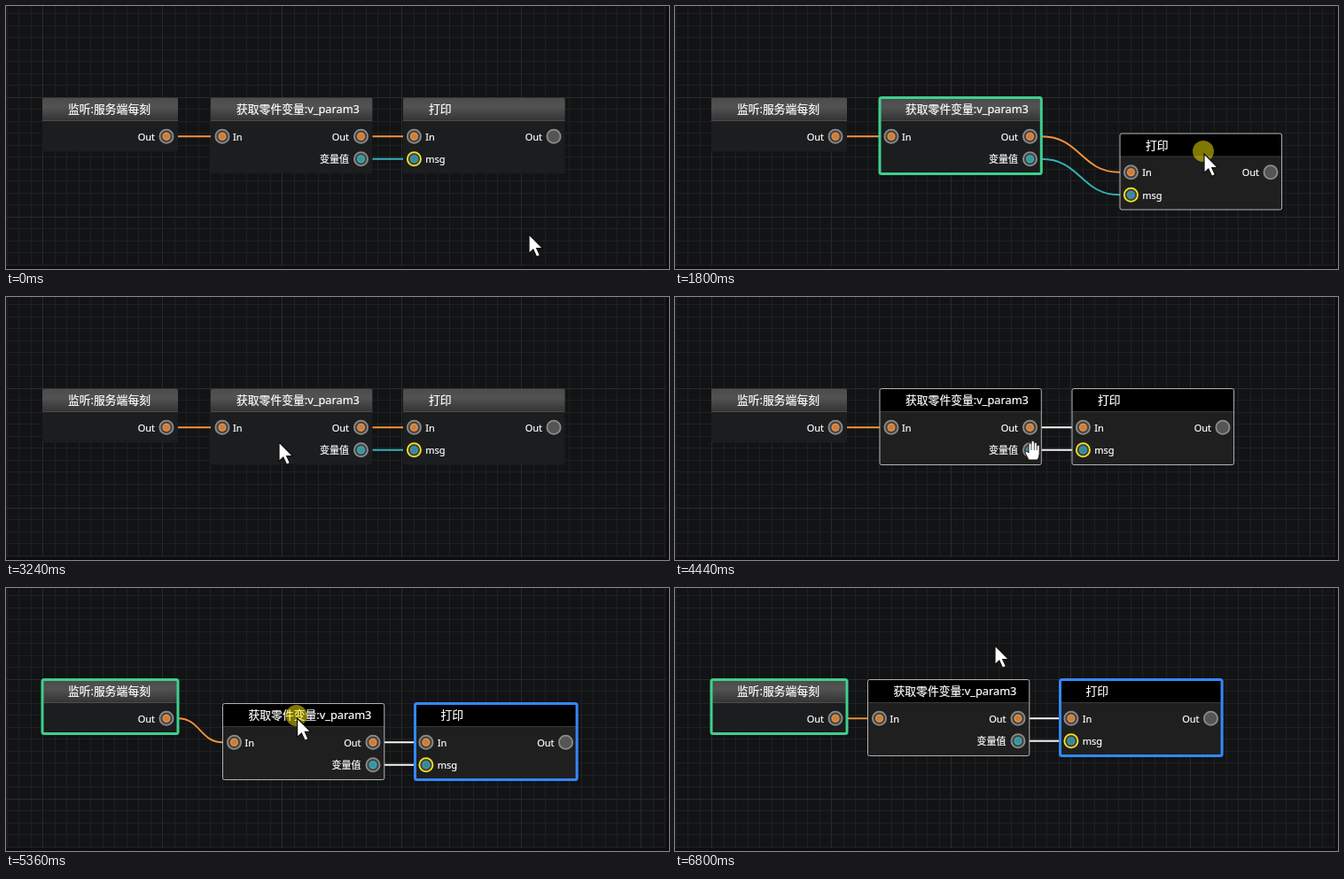
These frames come from a looping animation (748 by 297 pixels, 7.16 s). An HTML page:

```html
<!DOCTYPE html>
<html lang="zh">
<head>
<meta charset="utf-8">
<title>Node graph</title>
<style>
html, body { margin: 0; width: 100%; height: 100%; overflow: hidden; background: #121314; }
svg { display: block; }
text { font-family: "Noto Sans", "Noto Sans CJK SC", "Noto Sans CJK", sans-serif; font-size: 11px; fill: #fff; stroke: #fff; stroke-width: .2px; }
.title { font-size: 12.8px; }
</style>
</head>
<body>
<svg width="748" height="297" viewBox="0 0 748 297">
  <defs>
    <linearGradient id="head" x1="0" y1="0" x2="0" y2="1">
      <stop offset="0" stop-color="#4c4c4c"/>
      <stop offset=".4" stop-color="#525252"/>
      <stop offset="1" stop-color="#343434"/>
    </linearGradient>
  </defs>
  <g id="grid"></g>
  <path d="M745 0h3v297H0v-3h745z" fill="#0d0d0f"/>
  <g id="scene"></g>
</svg>
<script>
const LOOP = 7160, RATE = 15 / 1000, STEP = 13.5, LAG = 15, TOP = 103.5;
const ORANGE = '#f3933f', TEAL = '#36b0bb', GREEN = '#3ecf8e', BLUE = '#3388ff', WHITE = '#f4f4f4';
const scene = document.getElementById('scene');

// Pointer strokes: each runs smoothly from where the last one ended through evenly timed points
const strokes = [];
let tip = [590, 257];
function stroke(start, end, ...points) {
  const s = { start, end, points: [tip, ...points] };
  strokes.push(s);
  tip = points[points.length - 1];
  return s;
}

stroke(340, 600, [536, 126]);
const dragC = stroke(600, 2400, [590, 175], [630, 150], [550, 13], [325, 110], [500, 235],
  [597, 166], [606, 135], [565, 108], [536, 129]);
stroke(2680, 2960, [466, 249]);
const leave = stroke(3080, 3440, [308, 163], [190, 95], [128, 60]);
stroke(3600, 3740, [285, 60]);
const marquee = stroke(3740, 4180, [505, 256]);
stroke(4290, 4510, [404, 173], [319, 119]);
const dragB = stroke(4510, 6420, [400, 38], [440, 92], [330, 145], [278, 200], [300, 158], [345, 148], [310, 120]);
stroke(6640, 6800, [361, 64]);

const click = { start: leave.start, end: leave.start + 100 };
const presses = [dragC, click, marquee, dragB];
const during = (t, s) => t >= s.start && t < s.end;
const clamp = (v, lo, hi) => Math.max(lo, Math.min(hi, v));

function spline(a, b, c, d, u) {
  return b + u / 2 * (c - a + u * (2 * a - 5 * b + 4 * c - d + u * (3 * (b - c) + d - a)));
}

function pointer(t) {
  const s = strokes.filter(s => t >= s.start).pop() || strokes[0];
  const p = s.points, n = p.length - 1;
  const f = clamp((t - s.start) / (s.end - s.start), 0, 1) * n;
  const i = Math.min(n - 1, Math.floor(f));
  const at = k => p[clamp(k, 0, n)];
  return [0, 1].map(k => spline(at(i - 1)[k], at(i)[k], at(i + 1)[k], at(i + 2)[k], f - i));
}

// Grid-snapped offset of a dragged node, trailing the pointer slightly
function offset(t, s) {
  const now = pointer(clamp(t - LAG, s.start, s.end));
  return now.map((v, k) => Math.round((v - s.points[0][k]) / STEP) * STEP);
}

const label = (x, y, s, anchor = 'start') =>
  `<text x="${x}" y="${y}" text-anchor="${anchor}">${s}</text>`;

function port(x, y, color, ring = '#8c8c8c') {
  const core = color ? `<circle cx="${x}" cy="${y}" r="3.9" fill="${color}" fill-opacity=".75" stroke="${color}" stroke-width="1.2"/>` : '';
  return `<circle cx="${x}" cy="${y}" r="7.6" fill="${color ? '#454545' : '#555'}" stroke="${ring}" stroke-width="1.8"/>` + core;
}

function node({ x, y, w, h, title, selected, glow, ports }) {
  const border = glow ? `stroke="${glow}" stroke-width="3"` : selected ? 'stroke="#b4b4b4"' : '';
  return `<g transform="translate(${x} ${y})">` +
    `<rect width="${w}" height="${h}" rx="2" fill="${selected ? '#1f1f1f' : '#1b1d1e'}"/>` +
    `<path d="M0 26V2q0-2 2-2h${w - 4}q2 0 2 2v24z" fill="${selected ? '#000' : 'url(#head)'}"/>` +
    `<path d="M0 26h${w}" stroke="${selected ? '#3a3a3a' : '#4a4d4e'}"/>` +
    `<text class="title" x="29" y="17.7">${title}</text>${ports}` +
    `<rect width="${w}" height="${h}" rx="2" fill="none" ${border}/></g>`;
}

function wire(from, to, dy, color) {
  const x = from.x + from.w, y = from.y + dy, u = to.x, v = to.y + dy;
  const c = u < x ? Math.max(40, (x - u) / 2) : (u - x) / 2;
  return `<path d="M${x} ${y}C${x + c} ${y} ${u - c} ${v} ${u} ${v}" fill="none" stroke="${color}" stroke-width="1.9"/>`;
}

const arrow = (x, y) =>
  `<path transform="translate(${x} ${y + 1})" d="M0 0V21.5L4.8 17L8.6 25.3L12.4 23.6L8.7 15.5H15.4Z" fill="#fff" stroke="#111" stroke-width="1.2"/>`;

const hand = (x, y) =>
  `<g transform="translate(${x - 1} ${y})"><path d="M-4 11L-8 3Q-8 0-5 2L-4 3V-7Q-2.5-9.5-1-7V-9.5Q.7-12 2.3-9.5V-8Q4-10 5.3-7.5V-5Q7-7 8.2-4.5V4Q8 8 6 11Z" fill="#fff" stroke="#111"/>` +
  `<path d="M-1-7V0M2.3-8V0M5.3-6V0" stroke="#333" stroke-width=".9"/></g>`;

function draw(t) {
  const [cx, cy] = pointer(t);
  const both = t >= marquee.end, linked = t >= dragB.start;
  const onlyC = t >= dragC.start && t < click.start;
  const [bx, by] = offset(t, dragB);
  const [ox, oy] = onlyC ? offset(t, dragC) : [bx, by];
  const high = 43.8, low = 69.3;

  const A = {
    x: 41, y: TOP, w: 153, h: 61, title: '监听:服务端每刻', glow: linked && GREEN,
    ports: label(127, 48.3, 'Out', 'end') + port(140, high, ORANGE)
  };
  const B = {
    x: 231 + bx, y: TOP + by, w: 182.3, h: 86, title: '获取零件变量:v_param3',
    selected: both, glow: onlyC && GREEN,
    ports: label(25, 48.3, 'In') + label(156, 48.3, 'Out', 'end') + label(156, 73.8, '变量值', 'end') +
      port(13, high, ORANGE) + port(169.5, high, ORANGE) + port(169.5, low, TEAL)
  };
  const C = {
    x: 448 + ox, y: TOP + oy, w: 182.6, h: 86, title: '打印',
    selected: both || onlyC, glow: linked && BLUE,
    ports: label(25.3, 48.3, 'In') + label(25.3, 73.8, 'msg') + label(157, 48.3, 'Out', 'end') +
      port(12.4, high, ORANGE) + port(12.4, low, '#3b9db0', '#f4e61c') + port(170, high)
  };

  let s = wire(A, B, high, ORANGE) + wire(B, C, high, both ? WHITE : ORANGE) +
    wire(B, C, low, both ? WHITE : TEAL) + node(A) + node(B) + node(C);
  if (during(t, marquee)) {
    const [x, y] = marquee.points[0];
    s += `<rect x="${x}" y="${y}" width="${cx - x}" height="${cy - y}" fill="none" stroke="#a8a8a8" stroke-dasharray="5 4"/>`;
  }
  if (presses.some(p => during(t, p)))
    s += `<circle cx="${cx - 1}" cy="${cy - 2}" r="12" fill="#fff000" opacity=".5"/>`;
  const overPort = both && Math.hypot(cx - B.x - 169.5, cy - B.y - low) < 8;
  scene.innerHTML = s + (overPort ? hand(cx, cy) : arrow(cx, cy));
}

// Every tenth grid line is brighter; the pattern is anchored at (41.5, 103)
let grid = '';
for (let k = -8; k < 55; k++) {
  const x = Math.floor(41.5 + k * STEP) + .5, y = Math.floor(103 + k * STEP) + .5;
  grid += `<path d="M${x} 0V294M0 ${y}H745" stroke="${k % 10 ? '#1f2021' : '#292a2b'}"/>`;
}
document.getElementById('grid').innerHTML = grid;

let last = -1;
const begin = performance.now();
function tick() {
  const k = Math.floor((performance.now() - begin) % LOOP * RATE + 0.2);
  if (k !== last) draw((last = k) / RATE);
  requestAnimationFrame(tick);
}
tick();
</script>
</body>
</html>
```
